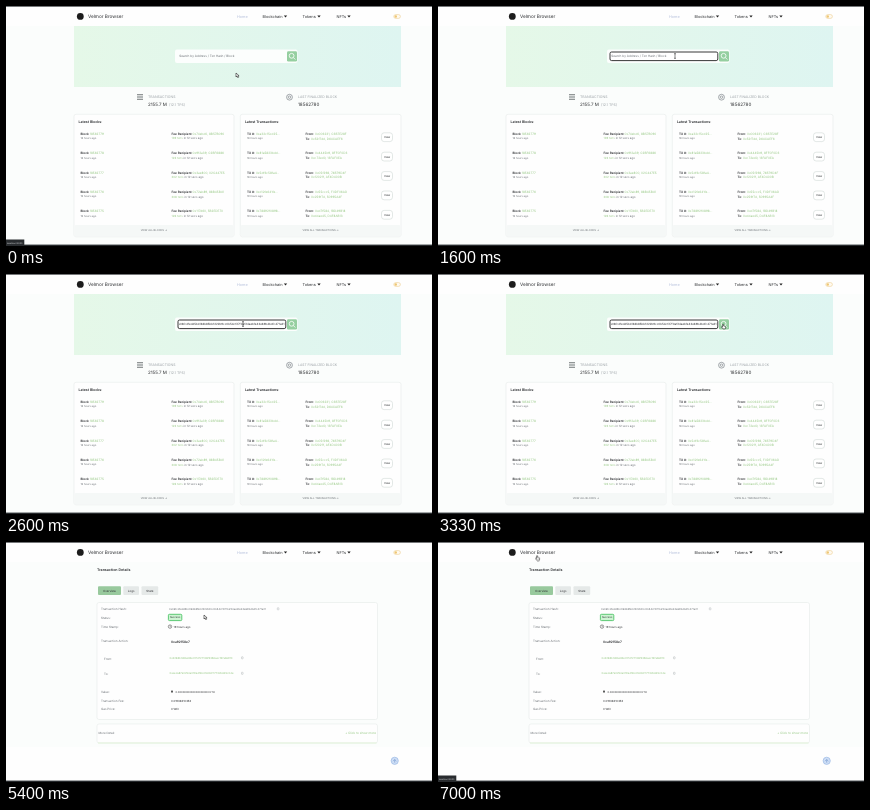
Animation of 426 by 240 pixels, one loop 7070 ms. Source, as an HTML page:

```html
<!DOCTYPE html>
<html lang="en">
<head>
<meta charset="utf-8">
<title>Block explorer walkthrough</title>
<style>
html, body { margin: 0; width: 100%; height: 100%; overflow: hidden; background: #fcfdfd; }
svg { display: block; }
#stage { width: 100%; height: 100%; }
text { font-family: Inter, Roboto, sans-serif; fill: #2b2d30; text-rendering: geometricPrecision; }
.b { font-weight: 600; }
.mid { text-anchor: middle; }
.end { text-anchor: end; }
.link { fill: #96c884; }
.soft { fill: #9aa0a5; }
.dim { fill: #6b7075; }
.card { fill: #fefefe; stroke: #e6ebea; stroke-width: .6; }

/* every part shares one 7070 ms clock */
.home, .detail, .idle, .focus, .hint, .hash, .status, .arrow, .beam, .hand, #pointer {
  animation: 7070ms step-end infinite;
}
.home { animation-name: home; }
.detail { animation-name: detail; }
.idle { animation-name: idle; }
.focus { animation-name: focus; }
.hint { animation-name: hint; }
.hash { animation-name: hash; }
.status { animation-name: status; }
.arrow { animation-name: arrow; }
.beam { animation-name: beam; }
.hand { animation-name: hand; }
#pointer { animation-name: move; animation-timing-function: ease-in-out; }

@keyframes home { 0% { visibility: visible } 50.9%, 100% { visibility: hidden } }
@keyframes detail { 0% { visibility: hidden } 50.9%, 100% { visibility: visible } }
@keyframes idle { 0% { opacity: 1 } 17%, 100% { opacity: 0 } }
@keyframes focus { 0% { opacity: 0 } 17%, 100% { opacity: 1 } }
@keyframes hint { 0% { opacity: 1 } 31%, 100% { opacity: 0 } }
@keyframes hash { 0% { opacity: 0 } 31%, 100% { opacity: 1 } }
@keyframes status { 0% { opacity: 1 } 7.5% { opacity: 0 } 95%, 100% { opacity: 1 } }
@keyframes arrow { 0% { opacity: 1 } 13% { opacity: 0 } 50.9% { opacity: 1 } 94.4%, 100% { opacity: 0 } }
@keyframes beam { 0% { opacity: 0 } 13% { opacity: 1 } 42% { opacity: 0 } 100% { opacity: 0 } }
@keyframes hand { 0% { opacity: 0 } 42% { opacity: 1 } 50.9% { opacity: 0 } 94.4%, 100% { opacity: 1 } }
@keyframes move {
  0%, 3% { transform: translate(230px, 67px) }
  10.3% { transform: translate(240px, 55px) }
  15%, 38% { transform: translate(237px, 50px) }
  44%, 63% { transform: translate(285px, 50px) }
  73%, 81% { transform: translate(198px, 73px) }
  95.5%, 100% { transform: translate(99px, 13.5px) }
}
</style>
</head>
<body>
<svg id="stage" viewBox="0 0 426 240" preserveAspectRatio="none"></svg>
<script>
let seed = 41;
const rand = () => (seed = seed * 16807 % 2147483647) / 2147483647;
const hex = n => Array.from({ length: n }, () => Math.floor(rand() * 16).toString(16)).join('');
const shortAddr = () => `0x${hex(6)}, ${hex(8).toUpperCase()}`;

const text = (x, y, size, str, cls = '') =>
  `<text x="${x}" y="${y}" font-size="${size}" class="${cls}">${str}</text>`;
const rect = (x, y, w, h, r, attrs) =>
  `<rect x="${x}" y="${y}" width="${w}" height="${h}" rx="${r}" ${attrs}/>`;
const path = (d, attrs) => `<path d="${d}" ${attrs}/>`;
const group = (cls, ...parts) => `<g class="${cls}">${parts.join('')}</g>`;
const pair = (x, y, label, value) =>
  text(x, y, 3.1, `<tspan class="b">${label}</tspan> <tspan class="link">${value}</tspan>`);
const rows = draw => Array.from({ length: 5 }, (_, i) => draw(128.8 + i * 19.4, i)).join('');
const ages = ['18 hours ago', '18 hours ago', '18 hours ago', '19 hours ago', '19 hours ago'];
const txHash = '0x' + hex(64);

function header() {
  const menu = (x, label, tip) => text(x, 11.8, 3.9, label) +
    path(`M${tip - 1.7} 9.6h3.4l-1.7 2z`, 'fill="#222"');
  return rect(0, 0, 426, 20, 0, 'fill="#fefefe"') +
    '<circle cx="74.3" cy="10.4" r="3.4" fill="#1c1c1c"/>' +
    text(82, 12.1, 4.7, 'Velmor Browser') +
    '<text x="231" y="11.8" font-size="3.8" style="fill:#b3bedb">Home</text>' +
    menu(256.5, 'Blockchain', 279.5) + menu(296.5, 'Tokens', 313) + menu(330.5, 'NFTs', 343) +
    rect(387.8, 8.6, 6.6, 3.8, 1.9, 'fill="#fffaf0" stroke="#edcf94" stroke-width=".6"') +
    '<circle cx="389.8" cy="10.5" r="1.2" fill="#efc774"/>';
}

function search() {
  return rect(68, 20, 327, 61, 0, 'fill="url(#mint)"') +
    rect(169, 43.5, 122.5, 13.5, 2, 'fill="#fcfefd"') +
    group('focus', rect(172, 46, 107.8, 8.6, 1.6, 'fill="#fff" stroke="#222" stroke-width=".9"')) +
    group('hint', text(173.2, 51.4, 3.1, 'Search by Address / Txn Hash / Block', 'dim')) +
    group('hash', `<svg x="173" y="46" width="106" height="8">${text(105.5, 5.3, 2.9, txHash, 'end')}</svg>`) +
    rect(281, 45.2, 10, 10.4, 1.4, 'fill="#95cfa0"') +
    '<g fill="none" stroke="#fff" stroke-width=".8"><circle cx="285.6" cy="49.8" r="2.4"/><path d="M287.4 51.6l1.9 1.9"/></g>';
}

function stats() {
  const bars = [88.7, 91, 93.3].map(y => path(`M131 ${y}h6`, 'stroke="#858b8b" stroke-width="1.2"')).join('');
  return bars + text(142, 92.4, 3.5, 'TRANSACTIONS', 'soft') +
    text(142, 99.5, 4.5, '2155.7 M') + text(163, 99.5, 3.5, '(12.1 TPS)', 'soft') +
    '<g fill="none" stroke="#8b9196" stroke-width=".8"><circle cx="283.5" cy="91.2" r="2.9"/><circle cx="283.5" cy="91.2" r="1.2"/></g>' +
    text(292, 92.4, 3.4, 'LAST FINALIZED BLOCK', 'soft') + text(292, 99.5, 4.6, '18562780');
}

function panel(x, w, title, more, body) {
  return rect(x, 108.3, w, 122.5, 2, 'class="card"') +
    rect(x + .4, 219, w - .8, 11.5, 1.5, 'fill="#f5f8f7"') +
    text(x + 4.6, 117, 3.5, title, 'b') + rows(body) +
    text(x + w / 2, 225.3, 2.6, more + ' →', 'dim mid');
}

function home() {
  const block = (y, i) => pair(74.5, y, 'Block', 18562779 - i) +
    text(74.5, y + 4.3, 2.6, ages[i], 'dim') +
    pair(165.5, y, 'Fee Recipient', shortAddr()) +
    text(165.5, y + 4.6, 2.9, `<tspan class="link">${120 + Math.floor(rand() * 90)} txns</tspan> in 12 secs ago`, 'dim');
  const tx = (y, i) => pair(241, y, 'TX #:', `0x${hex(10)}...`) +
    text(241, y + 4.3, 2.6, ages[i], 'dim') +
    pair(299.5, y, 'From:', shortAddr()) + pair(299.5, y + 4.7, 'To:', shortAddr()) +
    rect(375.5, y - 2, 11, 8.8, 2.6, 'fill="#fff" stroke="#d0d9d6" stroke-width=".6"') +
    text(381, y + 3.4, 2.7, 'View', 'mid');
  return group('home', search(), stats(),
    panel(68, 160, 'Latest Blocks:', 'VIEW ALL BLOCKS', block),
    panel(234.3, 160.7, 'Latest Transactions:', 'VIEW ALL TRANSACTIONS', tx));
}

function detail() {
  const tab = (x, w, label, fill) => rect(x, 44.2, w, 8.8, 1, `fill="${fill}"`) +
    text(x + w / 2, 49.6, 2.9, label, 'mid');
  const row = (y, label, value, x = 95) => text(x, y + 1, 3, label, 'dim') + value;
  const copy = (x, y) => rect(x, y - 1.2, 1.6, 2, .3, 'fill="none" stroke="#9fa7aa" stroke-width=".4"');
  const addr = y => text(163.5, y + .9, 2.65, '0x' + hex(40), 'link') + copy(235.5, y);
  return group('detail',
    rect(0, 205, 426, 34, 0, 'fill="#fefefe"'),
    text(91, 29.2, 3.6, 'Transaction Details', 'b'),
    tab(92, 23, 'Overview', '#98c99d'), tab(117.3, 15.7, 'Logs', '#e5e9e8'), tab(135.5, 16.7, 'State', '#e5e9e8'),
    rect(91, 60.5, 280.5, 117, 2, 'class="card"'),
    rect(91, 182, 280.5, 19, 2, 'class="card"'),
    path('M92 201h278.5', 'stroke="#d7efca" stroke-width=".7"'),
    row(67, 'Transaction Hash:', text(163, 67.9, 2.6, txHash, 'dim') + copy(271.3, 67)),
    row(75.5, 'Status:', rect(162.4, 72.3, 13.4, 6.3, 1, 'fill="#cdf4d2" stroke="#4fc468" stroke-width=".9"') +
      text(169.1, 76.4, 2.6, 'Success', 'mid')),
    row(84.6, 'Time Stamp:', '<circle cx="164" cy="84.6" r="1.7" fill="none" stroke="#555" stroke-width=".6"/>' +
      path('M164 83.5v1.2h.9', 'fill="none" stroke="#555" stroke-width=".4"') + text(167.6, 85.6, 2.8, '19 hours ago')),
    row(98.5, 'Transaction Action:', text(165, 100.7, 3.2, '0x' + hex(8), 'b')),
    row(116.5, 'From:', addr(116), 98),
    row(132.3, 'To:', addr(131.5), 98),
    row(149.8, 'Value:', rect(165.2, 148.6, 1.6, 1.9, 0, 'fill="#333"') +
      text(169.5, 150.7, 2.6, '0.0000000000000000000 ETH')),
    row(158.6, 'Transaction Fee:', text(165, 159.5, 2.8, '0.01936210352')),
    row(167.4, 'Gas Price:', text(165, 168.3, 2.8, '0 WEI')),
    text(92.5, 192.2, 2.9, 'More Detail:', 'dim'),
    text(370, 192.2, 3.1, '+ Click to show more', 'link end'),
    '<circle cx="388.7" cy="218.8" r="3.6" fill="#cfdff6" stroke="#9ab8e4" stroke-width=".7"/>' +
    path('M387 219.2l1.7-1.7 1.7 1.7M388.7 217.5v3.2', 'fill="none" stroke="#6f94cc" stroke-width=".6"'));
}

function pointer() {
  const ink = 'fill="#fff" stroke="#222" stroke-width=".6" stroke-linejoin="round"';
  return '<g id="pointer">' +
    group('arrow', path('M0 0v4l1-.9.7 1.6.8-.4-.7-1.5h1.3z', ink)) +
    group('beam', path('M-1-2.3h2M0-2.3v4.6M-1 2.3h2', 'fill="none" stroke="#333" stroke-width=".6"')) +
    group('hand', path('M-.4.4q.5-.7 1 0v1.5l1.8.5q.4.2.3.7l-.4 1.8h-2.3l-1.6-2 .4-.4.8.5z', ink)) +
    '</g>';
}

document.getElementById('stage').innerHTML =
  `<defs><linearGradient id="mint"><stop stop-color="#e5f8e8"/><stop offset="1" stop-color="#def5f1"/></linearGradient></defs>` +
  rect(0, 0, 426, 240, 0, 'fill="#fbfdfc"') + header() + home() + detail() +
  rect(0, 0, 426, .7, 0, 'fill="#3a3d3f"') + rect(0, 238.6, 426, 1.4, 0, 'fill="#25282b"') +
  group('status', rect(0, 233.5, 18.3, 6.5, 0, 'fill="#292c2f"'),
    '<text x="1" y="237.6" font-size="2.2" style="fill:#d8dbdd">localhost:3000</text>') +
  pointer();
</script>
</body>
</html>
```
